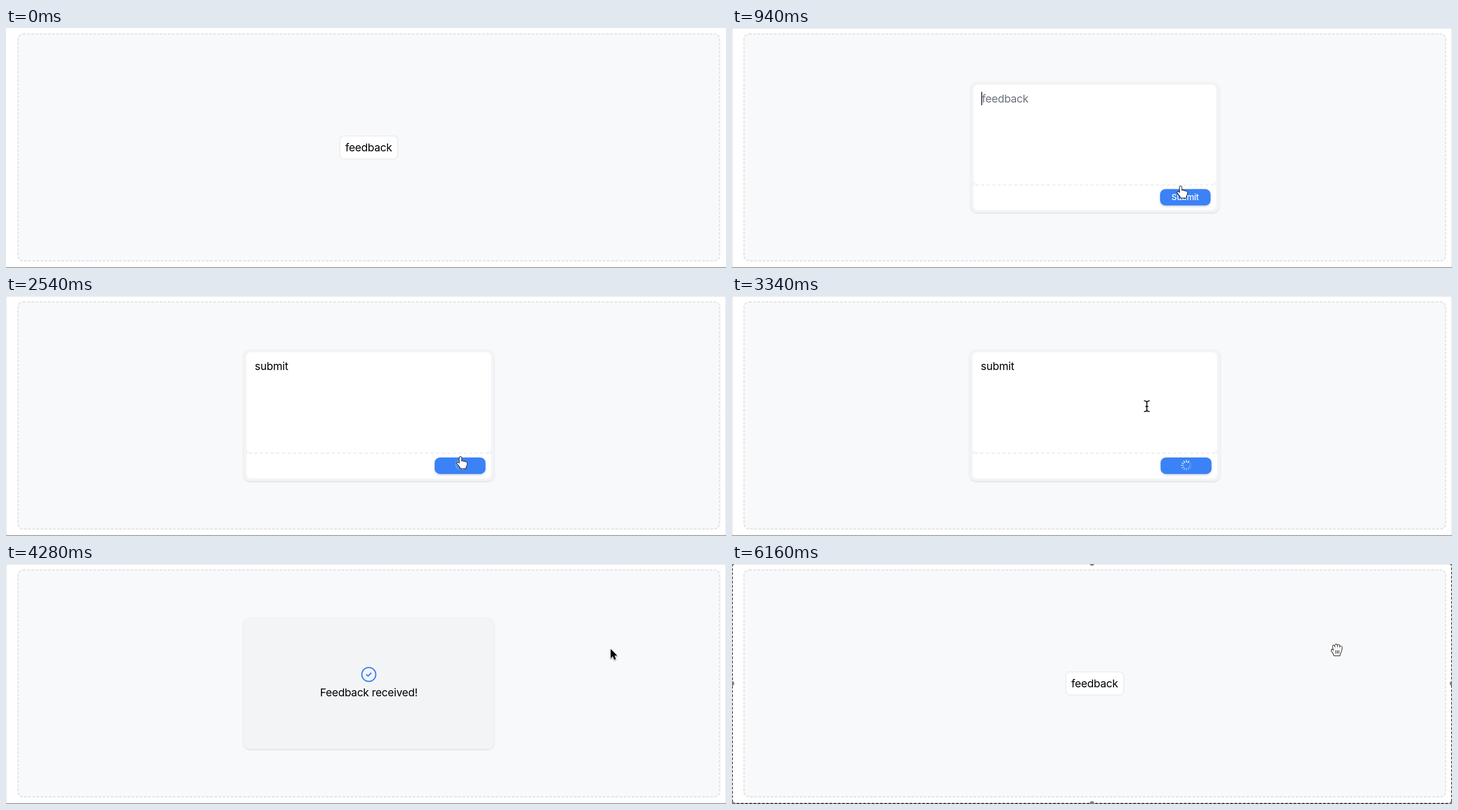
An HTML page with a canvas that plays this animation: 1280 px wide and 428 px high, repeating every 6.26 s.

```html
<!DOCTYPE html>
<html lang="en">
<head>
<meta charset="utf-8">
<title>Feedback popover</title>
<style>
html, body { margin: 0; width: 100%; height: 100%; overflow: hidden; background: #fff; }
canvas { display: block; width: 100vw; height: 100vh; }
</style>
</head>
<body>
<canvas id="stage" width="1280" height="428"></canvas>
<script>
const ctx = document.getElementById('stage').getContext('2d');
const LOOP = 6260;
const BUTTON = { x: 593.5, y: 192.5, w: 103, h: 41, r: 7 };
const POPOVER = { x: 422, y: 96, w: 446, h: 234, r: 12 };
const OPEN = 668, SUBMIT = 2340, SUCCESS = 3840, CLOSE = 4800, SELECT = 6100;
const KEYS = [1240, 1580, 1680, 1760, 1880, 1940];
const WORD = 'submit';
const BLUE = '#3b82f6';

const lerp = (a, b, p) => a + (b - a) * p;
const clamp = v => Math.max(0, Math.min(1, v));
const mix = (a, b, p) => `rgb(${a.map((v, i) => lerp(v, b[i], p)).join(',')})`;

// Critically damped spring, 0 to 1; rate is per second.
function spring(ms, rate) {
  if (ms <= 0) return 0;
  const k = ms / 1000 * rate;
  return k > 7.2 ? 1 : 1 - (1 + k) * Math.exp(-k);
}

function lerpBox(a, b, p) {
  const box = {};
  for (const key in a) box[key] = lerp(a[key], b[key], p);
  return box;
}

function roundPath(x, y, w, h, r) {
  ctx.beginPath();
  ctx.roundRect(x, y, w, h, r);
}

function setFont(size, weight, spacing) {
  ctx.font = `${weight} ${size}px Inter, sans-serif`;
  ctx.letterSpacing = spacing + 'px';
}

function bodyText(str, x, y, color, align = 'left') {
  setFont(19.2, 400, -0.25);
  ctx.textAlign = align;
  ctx.fillStyle = color;
  ctx.fillText(str, x, y);
}

function scoped(draw) {
  ctx.save();
  draw();
  ctx.restore();
}

function shadow(color, y, blur) {
  ctx.shadowColor = color;
  ctx.shadowOffsetY = y;
  ctx.shadowBlur = blur;
}

function drawPage(t) {
  ctx.fillStyle = '#fff';
  ctx.fillRect(0, 0, 1280, 428);
  roundPath(21.4, 10.7, 1247.2, 404.6, 9);
  ctx.fillStyle = '#f8f9fb';
  ctx.fill();
  scoped(() => {
    ctx.setLineDash([4.9, 2.45]);
    ctx.lineWidth = 2.3;
    ctx.strokeStyle = '#e2e4e7';
    ctx.stroke();
  });
  if (t >= 580) {
    ctx.fillStyle = '#e2e2e2';
    ctx.fillRect(0, 0, 1280, 1);
    ctx.fillRect(0, 0, 1, 428);
    ctx.fillRect(1279, 0, 1, 428);
  }
  ctx.fillStyle = '#929292';
  ctx.fillRect(0, 426.6, 1280, 1.4);
}

function drawPanel(box, p) {
  scoped(() => {
    roundPath(box.x, box.y, box.w, box.h, box.r);
    ctx.fillStyle = mix([255, 255, 255], [243, 244, 246], clamp(p * 2));
    shadow(`rgba(0,0,0,${0.16 * p})`, 1.2, 2.5);
    ctx.fill();
  });
  ctx.strokeStyle = mix([226, 228, 232], [240, 241, 244], clamp(p * 2));
  ctx.lineWidth = 1.2;
  ctx.stroke();
}

// Content laid out for the open popover, squeezed into the current box.
function fitInto(box, draw) {
  scoped(() => {
    ctx.translate(box.x, box.y);
    ctx.scale(box.w / POPOVER.w, box.h / POPOVER.h);
    ctx.translate(-POPOVER.x, -POPOVER.y);
    draw();
  });
}

function drawSpinner(t, x, y) {
  scoped(() => {
    ctx.translate(x, y);
    const head = (t - 3340) / 100 - 2;
    ctx.fillStyle = '#fff';
    const alpha = ctx.globalAlpha;
    for (let i = 0; i < 12; i++) {
      const age = (((head - i) % 12) + 12) % 12;
      scoped(() => {
        ctx.rotate(i * Math.PI / 6);
        ctx.globalAlpha = alpha * lerp(1, 0.15, age / 12);
        roundPath(4.9, -0.8, 4.7, 1.6, 0.8);
        ctx.fill();
      });
    }
  });
}

function drawSubmit(t) {
  scoped(() => {
    roundPath(762, 288, 90.5, 29.4, 9.5);
    ctx.fillStyle = BLUE;
    scoped(() => {
      shadow('rgba(40,70,130,.25)', 1.5, 4);
      ctx.fill();
    });
    ctx.clip();
    const p = spring(t - SUBMIT, 30.8);
    const alpha = ctx.globalAlpha;
    if (p < 1) {
      ctx.globalAlpha = alpha * (1 - p);
      setFont(15, 500, -0.2);
      ctx.textAlign = 'center';
      ctx.fillStyle = '#fff';
      ctx.fillText('Submit', 807, 308 + 30 * p);
    }
    if (p > 0) {
      ctx.globalAlpha = alpha * p;
      drawSpinner(t, 807.7, 302 - 30 * (1 - p));
    }
  });
}

function drawForm(t) {
  ctx.fillStyle = '#fff';
  roundPath(427.6, 100.2, 434.8, 179.6, [8, 8, 9, 9]);
  ctx.fill();
  roundPath(427.6, 280.2, 434.8, 45, [4, 4, 8, 8]);
  ctx.fill();
  scoped(() => {
    ctx.setLineDash([4.9, 4.9]);
    ctx.lineWidth = 1.2;
    ctx.strokeStyle = '#e2e3e5';
    ctx.beginPath();
    ctx.moveTo(432, 280.4);
    ctx.lineTo(858, 280.4);
    ctx.stroke();
  });
  drawSubmit(t);

  const typed = WORD.slice(0, KEYS.filter(k => t >= k).length);
  bodyText(typed, 442.3, 132, '#000');
  if (t < 2480) {
    const width = ctx.measureText(typed).width;
    ctx.fillStyle = '#000';
    ctx.fillRect(441.6 + width, 113, 1.4, 24);
  }
}

function drawSuccess() {
  ctx.strokeStyle = BLUE;
  ctx.lineWidth = 2.3;
  ctx.lineCap = ctx.lineJoin = 'round';
  ctx.beginPath();
  ctx.arc(645, 197, 12.4, 0, Math.PI * 2);
  ctx.stroke();
  ctx.beginPath();
  ctx.moveTo(641, 197.4);
  ctx.lineTo(643.8, 199.8);
  ctx.lineTo(648.8, 194.6);
  ctx.stroke();
  bodyText('Feedback received!', 645, 236, '#000', 'center');
}

function drawWidget(t) {
  const closing = spring(t - CLOSE, 26);
  const p = spring(t - OPEN, 24) * (1 - closing);
  const box = lerpBox(BUTTON, POPOVER, p);
  drawPanel(box, p);

  const done = spring(t - SUCCESS, 23);
  if (p > 0 && done < 1) fitInto(box, () => {
    ctx.globalAlpha = clamp(p * 3) * (1 - done);
    if (done > 0) ctx.filter = `blur(${4.9 * done}px)`;
    ctx.translate(0, 10 * done);
    drawForm(t);
  });
  if (done > 0 && closing < 0.5) fitInto(box, () => {
    ctx.globalAlpha = done * (1 - 2 * closing);
    if (done < 1) ctx.filter = `blur(${4.9 * (1 - done)}px)`;
    ctx.translate(0, -39 * (1 - done));
    drawSuccess();
  });

  if (t < KEYS[0]) {
    const color = mix([0, 0, 0], [107, 112, 122], clamp(p * 1.6));
    bodyText('feedback', lerp(603.3, 442.5, p), lerp(220, 132, p), color);
  } else if (closing > 0) {
    scoped(() => {
      ctx.globalAlpha = closing;
      bodyText('feedback', 603.3, 220, '#000');
    });
  }
}

// Pointer way points: time, x, y.
const TRAIL = [
  [80, 811, 373], [440, 666, 221], [780, 666, 221], [1000, 808, 287],
  [2600, 808, 287], [2920, 737.5, 196.5], [3540, 737.5, 196.5],
  [4160, 752, 169], [4280, 1075, 151.5]
];

function pointerAt(t) {
  const next = TRAIL.findIndex(k => k[0] > t);
  if (next < 0) return TRAIL[TRAIL.length - 1].slice(1);
  const a = TRAIL[next - 1], b = TRAIL[next];
  const u = (t - a[0]) / (b[0] - a[0]);
  const e = 1 - (1 - u) ** 2;
  return [lerp(a[1], b[1], e), lerp(a[2], b[2], e)];
}

const ARROW = new Path2D('M0 0V16.4L3.8 12.8L6.5 19L9.2 17.8L6.6 11.8H11.6Z');
const BEAM = new Path2D('M-4.5 -9.5C-2 -9.5 0 -8.8 0 -6.5V6.5C0 8.8 -2 9.5 -4.5 9.5' +
  'M4.5 -9.5C2 -9.5 0 -8.8 0 -6.5M0 6.5C0 8.8 2 9.5 4.5 9.5M-2 .5H2');
const FINGER = new Path2D('M-1.8 1.5C-1.8 -.6 1.6 -.6 1.6 1.5V8C2.5 6.7 5 6.9 5.2 8.6' +
  'C6.2 7.5 8.2 7.9 8.4 9.5C9.6 8.6 11.5 9.2 11.5 11C11.5 15 10.5 16 9.5 18V20.5H0' +
  'C-.5 17.5 -3.5 15 -6 11.5C-6.5 9.5 -4 9 -1.8 12Z');
const PALM = new Path2D('M-4.5 10C-5 6.5 -8 4 -9.3 1C-9.8 -1 -7.5 -1.8 -6 .8L-5 2' +
  'C-5.5 -1 -7.5 -5.5 -6.8 -7.2C-6 -8.8 -4.3 -8 -3.9 -6.5L-2.5 -2.5' +
  'C-2.8 -5 -3.5 -9.2 -1.6 -10C.3 -10.4 .7 -8.2 .9 -6.8L1.3 -2.8' +
  'C1.5 -5 1.7 -9.4 3.4 -9.5C5.3 -9.5 5.1 -7 5 -5.5L4.8 -2' +
  'C5.3 -4 5.8 -6.8 7.6 -6.7C9.8 -6.3 9.3 -3 8.8 -.5C8.2 3.5 6 6 5.5 10Z');
const CREASE = new Path2D('M-1.4 1V6M1.4 1V6M4 1V6');

function glyph(path, fill, line, width) {
  ctx.lineWidth = width;
  ctx.strokeStyle = line;
  ctx.stroke(path);
  if (fill) {
    ctx.fillStyle = fill;
    ctx.fill(path);
  }
}

function drawPointer(t) {
  if (t < 80 || (t >= KEYS[0] && t < 2240)) return;
  const [x, y] = pointerAt(t);
  const onButton = t < OPEN && x < 697 && y < 234;
  const onSubmit = t > OPEN && t < SUCCESS && x > 762 && y > 280;
  const onText = t > OPEN && t < SUCCESS && !onSubmit;
  scoped(() => {
    ctx.translate(x, y);
    ctx.lineCap = ctx.lineJoin = 'round';
    if (t >= SELECT) {
      ctx.translate(0, 1.8);
      glyph(PALM, '#fff', '#000', 1.8);
      glyph(CREASE, null, '#000', 1);
    } else if (onText) {
      glyph(BEAM, null, '#fff', 3.2);
      glyph(BEAM, null, '#000', 1.7);
    } else if (onButton || onSubmit) {
      glyph(FINGER, '#fff', '#000', 1.8);
    } else {
      shadow('rgba(0,0,0,.35)', 1, 2);
      glyph(ARROW, '#000', '#fff', 2.4);
    }
  });
}

function drawSelection() {
  scoped(() => {
    ctx.setLineDash([4.5, 3]);
    ctx.lineWidth = 1.6;
    ctx.strokeStyle = '#1c1c1c';
    ctx.beginPath();
    ctx.moveTo(0.4, 0);
    ctx.lineTo(0.4, 427);
    ctx.lineTo(1279.6, 427);
    ctx.lineTo(1279.6, 0);
    ctx.stroke();
  });
  ctx.fillStyle = '#808080';
  for (const x of [0, 640, 1280]) {
    for (const y of [-1, 213, 427]) {
      if (x === 640 && y === 213) continue;
      ctx.beginPath();
      ctx.arc(x, y, 4, 0, Math.PI * 2);
      ctx.fill();
    }
  }
}

const start = performance.now();

function frame() {
  const t = (performance.now() - start) % LOOP;
  drawPage(t);
  drawWidget(t);
  if (t >= SELECT) drawSelection();
  drawPointer(t);
  requestAnimationFrame(frame);
}
frame();
</script>
</body>
</html>
```
